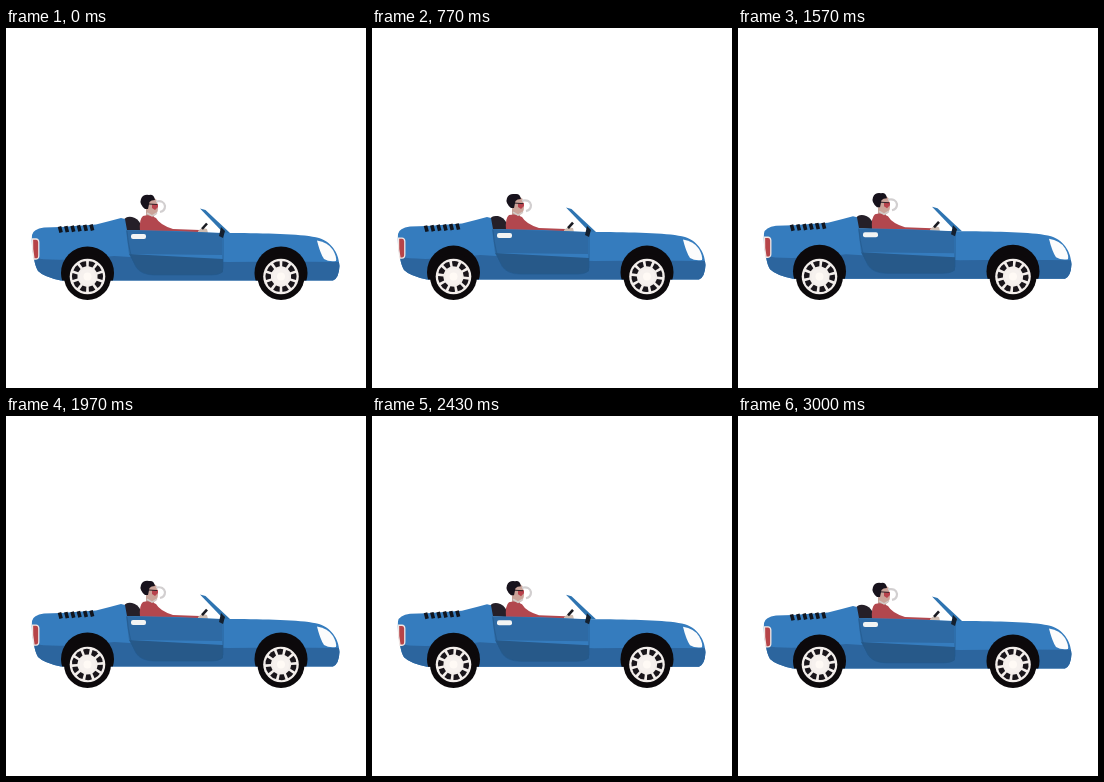
Write an HTML page that moves like this. It is 360x360 px and loops after 3030 ms.

```html
<!DOCTYPE html>
<html>
<head>
<meta charset="utf-8">
<style>
html, body { margin: 0; width: 100%; height: 100%; overflow: hidden; background: #fff; }
svg { display: block; width: 100vw; height: 100vh; }
</style>
</head>
<body>
<svg viewBox="0 0 360 360">
  <defs>
    <clipPath id="shell">
      <path id="outline" d="M26 207Q27 201 38 199.500L55 199L90 196.500Q104 193 115 190L119 191L121 202L170 203L216 205L232 205C266 205.500 298 206 313 210C328 215 333 228 333.500 238Q333 250 327 252.500L55 252.500Q38 249 32 243Q29 238 28 230Q25 217 26 207Z"/>
    </clipPath>
    <g id="wheel">
      <circle r="23.500" fill="#0c090b"/>
      <circle r="17.800" fill="#f3eeeb"/>
      <g class="spin"></g>
      <circle r="8" fill="#f6f1ee"/>
      <circle r="4" fill="#fffaf5"/>
    </g>
  </defs>

  <g id="car">
    <!-- seat and driver -->
    <path d="M117 202L118 192Q120 188 126 189Q132 190 135 197L137 203Z" fill="#251f28"/>
    <path d="M140 180H148V190H140Z" fill="#c3a097"/>
    <path d="M134 203Q133 191 137 188Q144 186 150 190Q154 197 167 201L194 202V205H134Z" fill="#b2474e"/>
    <path d="M141 170Q149 168 151 173L152 180Q152 187 147 188Q142 187 141 181Z" fill="#cba399"/>
    <path d="M146 176H152V179L149 182L146 180Z" fill="#b8434d"/>
    <path d="M149 172Q145 172 143.500 174L142 181L139 181Q133 176 135 171Q137 166 143 167Q148 166 149 172Z" fill="#17121c"/>
    <path d="M143 176L151 176.500" stroke="#30242a"/>
    <path d="M141 185L146 188L151 185" fill="none" stroke="#d2cbc8" stroke-width="1.500"/>
    <path d="M150 173.500Q158 172 159 178Q159 183 154 184" fill="none" stroke="#d2cfd0" stroke-width="2.200"/>
    <path d="M192 203Q195 199 201 201L202 205H192Z" fill="#cdbbb0"/>
    <path d="M196 201L201 195.500" stroke="#191b22" stroke-width="2.600"/>

    <!-- bodywork -->
    <use href="#outline" fill="#357cbe"/>
    <g clip-path="url(#shell)">
      <path d="M24 229Q47 235 108 228Q175 232 222 234Q278 233 335 234V256H24Z" fill="#2c659e"/>
      <path d="M120 202L216 205V227L123 226Z" fill="#2e6aa4"/>
      <path d="M123 226L217 231V244Q214 247 205 247H147Q133 246 129 237Z" fill="#275989"/>
      <circle cx="81.500" cy="245" r="26.500" fill="#0c090b"/>
      <circle cx="275" cy="245" r="26.500" fill="#0c090b"/>
    </g>
    <path d="M121 203Q123 227 130 239Q135 247 149 247H205Q217 247 217 240V206" fill="none" stroke="#23598d" stroke-width=".7"/>
    <path d="M194 180.500L199.500 182L224 205H217.500Z" fill="#2e74b1"/>
    <path d="M215 199L219 203L217 210L213 208Z" fill="#14202f"/>
    <rect x="125" y="206" width="15" height="5" rx="2" fill="#f3f4f3"/>
    <path d="M26.500 211H30Q32.500 211 32.800 214V227Q33 231 30 231H28Q26 222 26.500 211Z" fill="#b64448" stroke="#f0e7e5" stroke-width="1.300"/>
    <path d="M311 212.500Q322 214 327 222Q331 229 330 233Q323 234 318 231Q314 225 311 212.500Z" fill="#fcfcfc"/>
    <g id="vents" stroke="#11151e" stroke-width="3.600"></g>
  </g>

  <use href="#wheel" x="81.500" y="248.500"/>
  <use href="#wheel" x="275" y="248.500"/>
</svg>
<script>
const LOOP = 3030;
const STEP = 100 / 3;  // ms per picture
const CYCLE = 13;      // pictures per bounce and wheel turn
const ROUNDING = 3.4;  // step starts are rounded to 10 ms
const NS = "http://www.w3.org/2000/svg";
const car = document.getElementById("car");
const vents = document.getElementById("vents");
const spin = document.querySelector(".spin");

function addPath(parent, d, attrs = {}) {
  const path = document.createElementNS(NS, "path");
  path.setAttribute("d", d);
  for (const key in attrs) path.setAttribute(key, attrs[key]);
  parent.append(path);
}

for (let i = 0; i < 6; i++) {
  addPath(vents, `M${53.5 + i * 6.3} ${198.5 - i * 0.4}l1.600 6`);
}

for (let i = 0; i < 10; i++) {
  addPath(spin, "M-3.400-15Q0-16.300 3.400-15L2-10H-2Z",
    { fill: "#19151a", transform: `rotate(${18 + i * 36})` });
}

function draw() {
  const t = performance.now() % LOOP;
  const phase = Math.floor((t + ROUNDING) / STEP) % CYCLE / CYCLE;
  const lift = 1 - Math.cos(2 * Math.PI * phase);
  car.setAttribute("transform", `translate(0 ${-lift})`);
  spin.setAttribute("transform", `rotate(${360 * phase})`);
  requestAnimationFrame(draw);
}
draw();
</script>
</body>
</html>
```
